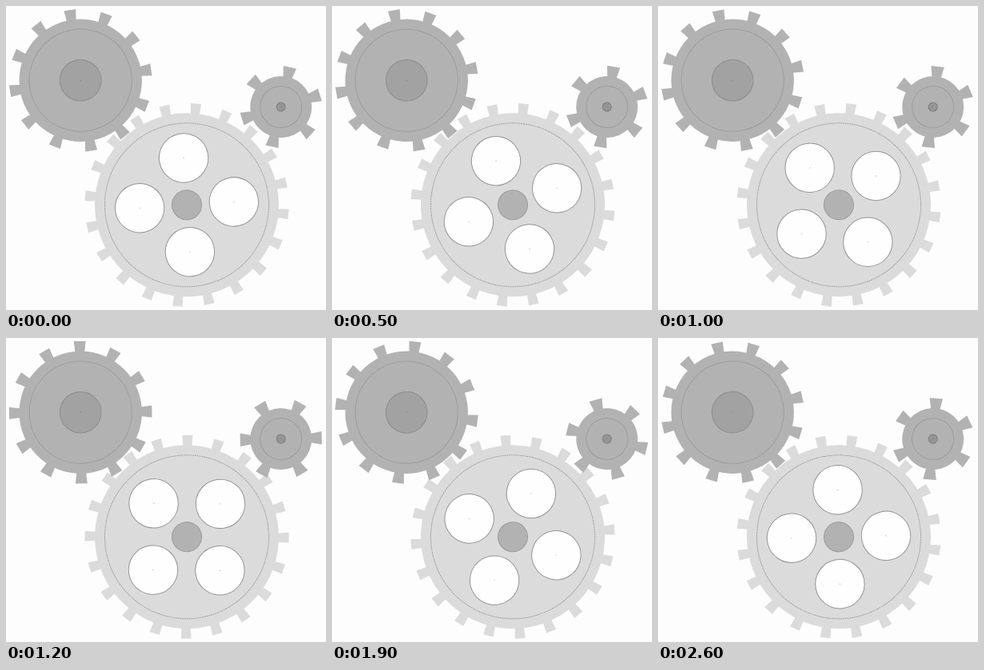
Animation, 400 px wide and 381 px high, one loop 2.7 s. Source, as an HTML page with a canvas:

```html
<!DOCTYPE html>
<html lang="en">
<head>
<meta charset="utf-8">
<title>Meshing gears</title>
<style>
  html, body { margin: 0; width: 100%; height: 100%; overflow: hidden; background: #fefdfe; }
  canvas { display: block; }
</style>
</head>
<body>
<canvas id="stage" width="400" height="381"></canvas>
<script>
const ctx = document.getElementById('stage').getContext('2d');
const STEP = 100, STEPS = 27, TAU = Math.PI * 2, DRIVE_TEETH = 20;

// Rotation of the large gear in degrees at chosen steps; the speed varies slightly.
const turnKeys = [[0, 12.8], [5, 29.85], [10, 47], [15, 63.45], [19, 76.15], [23, 90], [26, 100.4], [27, 102.8]];

const large = { x: 226, y: 249.3, teeth: 20, body: 115, tip: 127.5, tipWidth: 13, rootWidth: 11,
                dir: -1, fill: '#dcdbdc', ring: 102.5, ringColor: '#a09fa0', dash: [2, 0.8],
                hub: 18.5, hubFill: '#b3b2b3', hubStroke: '#9b9a9b' };
const left = { x: 93.2, y: 93.2, teeth: 12, body: 76.7, tip: 89.2, tipWidth: 15, rootWidth: 11.5,
               dir: 1, fill: '#b3b2b3', ring: 64, ringColor: '#9d9c9d', dash: [],
               hub: 25.8, hubFill: '#a3a2a3', hubStroke: '#8d8c8d', dot: true };
const small = { x: 343.7, y: 126.5, teeth: 6, body: 38.5, tip: 51, tipWidth: 16.5, rootWidth: 11,
                dir: 1, fill: '#b3b2b3', ring: 26, ringColor: '#9d9c9d', dash: [],
                hub: 5.5, hubFill: '#969596', hubStroke: '#7c7b7c', dot: true };

function turnAt(step) {
  const i = turnKeys.findIndex(([s]) => s > step);
  const [s0, a0] = turnKeys[i - 1], [s1, a1] = turnKeys[i];
  return a0 + (a1 - a0) * (step - s0) / (s1 - s0);
}

function circle(x, y, r, fill, stroke, dash = []) {
  ctx.beginPath();
  ctx.arc(x, y, r, 0, TAU);
  if (fill) {
    ctx.fillStyle = fill;
    ctx.fill();
  }
  if (stroke) {
    ctx.setLineDash(dash);
    ctx.lineWidth = 1;
    ctx.strokeStyle = stroke;
    ctx.stroke();
  }
}

function drawTooth(g) {
  const root = g.body - 2, tip = g.tipWidth / 2, base = g.rootWidth / 2;
  ctx.beginPath();
  ctx.moveTo(root, -base);
  ctx.lineTo(g.tip, -tip);
  ctx.lineTo(g.tip, tip);
  ctx.lineTo(root, base);
  ctx.fill();
}

function drawHoles() {
  for (let i = 0; i < 4; i++) {
    const a = TAU * (i / 4 + 9 / 360);
    const x = 59 * Math.cos(a), y = 59 * Math.sin(a);
    circle(x, y, 30.7, '#fefefe', '#969596');
    circle(x, y, 0.6, '#aaa');
  }
}

function drawGear(g, turn) {
  ctx.save();
  ctx.translate(g.x, g.y);
  ctx.rotate(g.dir * turn * DRIVE_TEETH / g.teeth * TAU / 360);
  ctx.fillStyle = g.fill;
  for (let i = 0; i < g.teeth; i++) {
    drawTooth(g);
    ctx.rotate(TAU / g.teeth);
  }
  circle(0, 0, g.body, g.fill);
  circle(0, 0, g.ring, null, g.ringColor, g.dash);
  if (g === large) drawHoles();
  circle(0, 0, g.hub, g.hubFill, g.hubStroke);
  if (g.dot) circle(0, 0, 0.6, '#7c7b7c');
  ctx.restore();
}

function draw(now) {
  const turn = turnAt(Math.floor(now / STEP) % STEPS);
  ctx.fillStyle = '#fefdfe';
  ctx.fillRect(0, 0, 400, 381);
  for (const gear of [large, left, small]) drawGear(gear, turn);
}

let start;
function tick(now) {
  start ??= now;
  draw(Math.max(0, now - start));
  requestAnimationFrame(tick);
}
draw(0);
requestAnimationFrame(tick);
</script>
</body>
</html>
```
